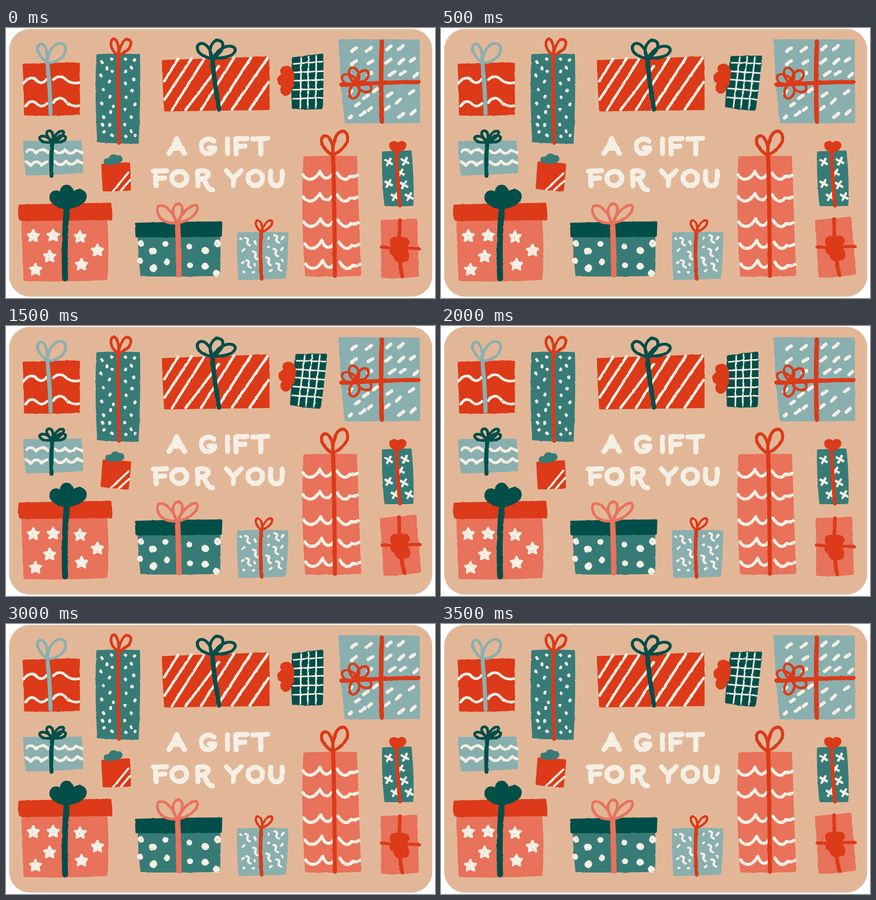
Recreate the animation shown at these times as an HTML page. Size 943 px wide and 594 px high, loop 4000 ms.

```html
<!DOCTYPE html>
<html lang="en">
<head>
<meta charset="utf-8">
<title>A gift for you</title>
<style>
  html, body { margin: 0; width: 100%; height: 100%; overflow: hidden; background: #fff; }
  svg { display: block; width: 943px; height: 594px; }
  path, ellipse { fill: none; stroke: currentColor; stroke-linecap: round; stroke-linejoin: round; }
  .fill { fill: currentColor; stroke-width: 5; }
  .red { color: #dc3a18; }
  .teal { color: #377b77; }
  .dark { color: #024e49; }
  .blue { color: #8aafaf; }
  .pink { color: #e8725a; }
  .cream { color: #f5efe4; }
  .gift { filter: url(#rough); }
  .gift .cream { filter: url(#chalk); }
  #plaid { transform-origin: 663px 118px; }
  #cube { transform-origin: 242px 328px; }
  #rose { transform-origin: 866px 484px; }
  .tilt #plaid { transform: translate(2px, .5px) rotate(6.3deg); }
  .tilt #cube { transform: translate(-1px, -1.5px) rotate(7.3deg); }
  .tilt #rose { transform: translate(1.5px, -2.5px) rotate(-3.3deg); }
</style>
</head>
<body>
<svg id="card" viewBox="0 0 943 594">
  <defs>
    <filter id="rough" color-interpolation-filters="sRGB">
      <feTurbulence type="fractalNoise" baseFrequency=".07" numOctaves="3" seed="4"/>
      <feDisplacementMap in="SourceGraphic" scale="2.6" xChannelSelector="R" yChannelSelector="G"/>
    </filter>
    <filter id="chalk" color-interpolation-filters="sRGB">
      <feTurbulence type="fractalNoise" baseFrequency=".3" numOctaves="2" seed="9"/>
      <feColorMatrix values="0 0 0 0 1  0 0 0 0 1  0 0 0 0 1  0 0 0 9 -1.7"/>
      <feComposite in="SourceGraphic" operator="in"/>
    </filter>
    <path id="star" class="fill" d="M0-12L4-4 12-3 6 3 8 11 0 7-8 11-6 3-12-3-4-4Z"/>
    <path id="cross" d="M-7-4L7 4M4-7L-4 7" stroke-width="5.5"/>
    <path id="curl" d="M0 0q8 1 5 7t5 9" stroke-width="5"/>
    <path id="scallop" d="M0 8C8 22 26 22 37 0C44 18 54 20 63 8M75 4C84 20 96 22 103 11Q111 14 119 9" stroke-width="7"/>
    <ellipse id="petal" cx="19" rx="16" ry="10.5"/>
  </defs>

  <rect x="7" y="2" width="930" height="589" rx="46" fill="#e2b798"/>

  <!-- red box, blue ribbon -->
  <g class="gift">
    <path class="fill red" d="M39 81Q100 79 160 78Q160 130 160 189Q100 191 42 190Q42 130 39 81Z"/>
    <g class="cream" stroke-width="6">
      <path d="M39 121C48 108 58 107 67 115S82 122 89 113M104 114C112 106 122 104 130 112S150 123 160 120"/>
      <path d="M43 172C50 160 60 159 68 167S84 172 90 166M104 164C112 153 122 151 130 160S150 174 160 171"/>
    </g>
    <g class="blue">
      <path stroke-width="9" d="M91 78Q97 135 98 188"/>
      <path stroke-width="6" d="M91 77C76 66 65 48 71 38C79 29 92 40 91 77C92 50 106 33 121 34C138 37 133 62 112 72Q101 77 91 77"/>
    </g>
  </g>

  <!-- tall teal box -->
  <g class="gift">
    <path class="fill teal" d="M201 60Q245 58 292 60Q294 150 289 252Q245 252 203 249Q197 150 201 60Z"/>
    <path class="cream" stroke-width="6.5" d="M210 74l1 2M232 68l1 1M222 88l0 2M233 95l1 1M208 104l1 2M228 117l-1 2M213 135l1 1M229 150l-1 2M210 165l1 2M236 172l0 1M214 195l1 2M230 184l0 2M212 212l1 2M228 212l0 2M233 236l1 1M216 228l-1 1M262 68l1 1M283 70l-1 1M275 86l1 2M263 96l-1 1M281 112l0 2M262 121l1 1M277 137l-1 2M264 152l1 1M284 167l-1 2M262 178l0 1M275 195l1 2M261 211l0 2M275 226l1 2M263 238l1 1M284 236l0 1"/>
    <g class="red">
      <path stroke-width="8" d="M247 60C246 120 247 200 249 253"/>
      <path stroke-width="6" d="M247 60C233 52 227 36 233 26C240 19 250 32 247 60C250 40 258 24 268 25C280 28 274 46 262 52Q255 58 247 60"/>
    </g>
  </g>

  <!-- wide striped box -->
  <g class="gift">
    <path class="fill red" d="M345 73Q460 69 576 65Q577 120 577 178Q460 180 350 181Q347 130 345 73Z"/>
    <path class="cream" stroke-width="6" d="M378 68L348 117M408 67L349 157M437 66L365 180M468 84L395 180M501 66L429 180M538 66L465 179M575 66L497 179M577 119L536 179"/>
    <g class="dark">
      <path stroke-width="10" d="M454 68C456 110 464 150 468 179"/>
      <path stroke-width="6.5" d="M453 67C436 64 418 56 421 40C426 27 449 34 453 67C444 50 450 28 466 27C482 29 478 46 468 56Q462 63 455 66C462 52 480 36 498 41C510 46 502 58 490 62Q474 67 455 66"/>
    </g>
  </g>

  <!-- plaid box -->
  <g class="gift" id="plaid">
    <path class="fill dark" d="M631 67Q660 63 695 59Q696 120 694 176Q660 178 631 175Q628 120 631 67Z"/>
    <path class="cream" stroke-width="3.5" d="M649 65L647 176M665 63L663 176M682 61L681 176M632 79L696 74M631 98L697 95M631 116L697 114M631 136L696 134M631 156L696 153"/>
    <path class="fill red" d="M631 103C630 84 611 82 606 91C603 98 610 104 610 104C594 106 595 126 610 125C600 137 608 150 618 146C629 141 622 131 631 126Z"/>
  </g>

  <!-- large blue box -->
  <g class="gift">
    <path class="fill blue" d="M733 27Q820 27 907 28Q907 110 908 206Q830 208 747 207Q738 130 733 27Z"/>
    <path class="cream" stroke-width="7.5" d="M760 51l10-7M792 51l11-8M837 47l9-7M864 47l9-8M759 80l11-8M796 78l10-6M836 77l9-8M864 78l10-9M889 73l9-6M795 104l8-6M843 104l11-8M867 102l10-7M897 107l8-7M754 144l6-5M786 155l10-7M808 140l8-6M838 150l10-7M858 165l9-8M887 145l9-7M769 171l7-5M797 181l6-5M779 192l10-7M834 179l8-6M864 196l10-8M891 189l8-7M755 198l5-4"/>
    <g class="red">
      <path stroke-width="10" d="M826 30C824 90 824 150 826 206"/>
      <path stroke-width="9" d="M737 125C790 123 850 118 907 119"/>
      <g transform="translate(771 121)" stroke-width="5.5">
        <use href="#petal" transform="rotate(-48)"/>
        <use href="#petal" transform="rotate(-108)"/>
        <use href="#petal" transform="rotate(203)"/>
        <use href="#petal" transform="rotate(106)"/>
        <use href="#petal" transform="rotate(26)"/>
      </g>
    </g>
  </g>

  <!-- blue zigzag box -->
  <g class="gift">
    <path class="fill blue" d="M40 251Q100 251 164 250Q167 285 167 317Q100 321 46 322Q41 290 40 251Z"/>
    <g class="cream" stroke-width="6.5">
      <path d="M46 272Q55 262 66 275Q80 261 92 274M108 270Q118 282 130 268Q142 284 154 268L167 274"/>
      <path d="M44 294L55 302Q66 287 78 301L90 294M108 294Q120 308 132 293Q144 307 156 292L167 297"/>
    </g>
    <g class="dark">
      <path stroke-width="9" d="M102 252C98 280 100 300 100 325"/>
      <path stroke-width="6" d="M102 251C85 254 72 247 74 241C80 234 95 240 102 251C88 240 85 226 96 226C104 228 104 240 102 251C106 234 118 225 125 227C132 232 118 246 103 250C112 238 128 233 131 240C132 248 120 253 103 251"/>
    </g>
  </g>

  <!-- small red box -->
  <g class="gift" id="cube">
    <path class="fill red" d="M212 301Q240 299 270 298Q272 325 272 355Q240 357 215 357Q213 330 212 301Z"/>
    <path class="cream" stroke-width="4.5" d="M269 318L236 358M273 334L253 357"/>
    <path class="fill teal" d="M234 298C222 301 215 297 218 291C220 288 225 288 228 289C229 279 240 278 242 284C249 280 256 285 253 291C249 296 242 298 234 298Z"/>
  </g>

  <!-- pink box with stars -->
  <g class="gift">
    <path class="fill pink" d="M36 422Q130 422 220 420Q225 490 221 552Q130 557 41 554Q38 490 36 422Z"/>
    <path class="fill red" d="M30 391Q130 388 229 387Q232 404 231 420Q130 422 31 422Q28 405 30 391Z"/>
    <g class="cream">
      <use href="#star" x="60" y="457"/>
      <use href="#star" x="104" y="456"/>
      <use href="#star" x="163" y="459"/>
      <use href="#star" x="201" y="489"/>
      <use href="#star" x="96" y="502"/>
      <use href="#star" x="65" y="531"/>
      <use href="#star" x="166" y="520"/>
    </g>
    <g class="dark">
      <path stroke-width="13" d="M134 392C129 440 128 510 130 551"/>
      <path class="fill" d="M129 396C114 394 96 384 98 370C101 358 113 357 121 365C118 342 147 341 147 364C158 351 176 358 175 372C173 386 152 393 139 396Z"/>
    </g>
  </g>

  <!-- teal box with dots -->
  <g class="gift">
    <path class="fill teal" d="M292 458L468 457Q470 500 468 543Q380 545 298 544Q293 500 292 458Z"/>
    <path class="fill dark" d="M286 431Q380 428 473 428L472 457Q380 458 287 458Z"/>
    <g class="cream">
      <path stroke-width="12.5" d="M296 473l1 2M350 475l1 0M294 512l1 1M353 515l1-1M403 480l0 1M404 522l1 0"/>
      <path stroke-width="15" d="M321 491l3 0M323 529l2-1M437 489l2 1M465 474l0 1M437 524l1 0M462 539l1 1"/>
    </g>
    <g class="pink">
      <path stroke-width="12" d="M377 430C379 470 380 510 380 543"/>
      <path stroke-width="6" d="M375 429C345 432 328 412 334 394C343 384 365 398 376 429C364 410 364 388 378 387C392 387 390 408 377 429C386 408 404 388 418 390C429 398 408 425 377 429"/>
    </g>
  </g>

  <!-- blue confetti box -->
  <g class="gift">
    <path class="fill blue" d="M510 452Q560 450 618 452Q618 500 613 549Q560 551 513 552Q510 500 510 452Z"/>
    <g class="cream">
      <use href="#curl" x="526" y="462"/>
      <use href="#curl" x="590" y="456"/>
      <use href="#curl" x="543" y="492"/>
      <use href="#curl" x="588" y="486"/>
      <use href="#curl" x="528" y="511"/>
      <use href="#curl" x="572" y="505"/>
      <use href="#curl" x="595" y="518"/>
      <path stroke-width="5" d="M515 463l2 1M576 463l2-2M606 465l4-5M546 470l3 5M520 490l4-4M519 517l3-2M546 519l1 3M605 488l3-4M576 482l2-1M580 535l4-3M543 538l2-1M606 511l2 2M522 536l2 1"/>
    </g>
    <g class="red">
      <path stroke-width="8" d="M561 450C558 490 560 520 562 552"/>
      <path stroke-width="5" d="M562 449C548 440 546 425 553 423C561 423 565 438 562 449C566 432 578 420 584 424C589 434 574 444 562 449"/>
    </g>
  </g>

  <!-- tall pink box -->
  <g class="gift">
    <path class="fill pink" d="M656 285Q710 283 769 284Q773 410 778 543Q720 546 660 544Q650 410 656 285Z"/>
    <g class="cream">
      <use href="#scallop" x="653" y="315"/>
      <use href="#scallop" x="653" y="363"/>
      <use href="#scallop" x="655" y="419"/>
      <use href="#scallop" x="657" y="467"/>
      <use href="#scallop" x="659" y="511"/>
    </g>
    <g class="red">
      <path stroke-width="9" d="M719 282C722 370 722 460 723 545"/>
      <path stroke-width="7" d="M718 280C700 270 688 250 696 240C706 230 722 250 718 280C718 255 724 226 742 227C758 232 754 264 718 280"/>
    </g>
  </g>

  <!-- teal box with crosses -->
  <g class="gift">
    <path class="fill teal" d="M829 274Q860 272 889 272Q895 330 893 389Q860 390 834 389Q828 330 829 274Z"/>
    <g class="cream">
      <use href="#cross" x="841" y="295"/>
      <use href="#cross" x="877" y="293"/>
      <use href="#cross" x="867" y="319"/>
      <use href="#cross" x="841" y="342"/>
      <use href="#cross" x="875" y="345"/>
      <use href="#cross" x="855" y="371"/>
      <use href="#cross" x="886" y="371"/>
    </g>
    <g class="red">
      <path stroke-width="8" d="M858 273C861 320 862 360 866 391"/>
      <path class="fill" d="M860 273C848 268 842 260 846 254C852 249 860 251 861 257C866 248 877 250 878 258C877 266 868 270 860 273Z"/>
    </g>
  </g>

  <!-- pink box, red rosette -->
  <g class="gift" id="rose">
    <path class="fill pink" d="M826 425Q865 423 901 422Q904 480 905 545Q865 549 827 547Q828 485 826 425Z"/>
    <g class="red">
      <path stroke-width="8" d="M866 423C864 460 862 500 871 547"/>
      <path stroke-width="6.5" d="M825 482C855 487 880 482 909 486"/>
      <path class="fill" d="M863 465C858 459 846 462 846 470C846 477 850 480 853 481C843 486 843 497 853 498C855 514 868 518 874 511C883 514 887 502 881 492C877 486 877 484 879 481C888 474 885 463 876 463C870 461 866 462 863 465Z"/>
    </g>
  </g>

  <!-- hand lettering -->
  <g class="gift" role="img" aria-label="A GIFT FOR YOU" color="#f5efe4" stroke-width="11">
    <path d="M358 276Q370 260 375 243Q383 262 392 276M364 265L387 264"/>
    <path d="M457 249C446 239 429 246 429 261C430 281 457 280 459 264L447 264"/>
    <path d="M487 244L487 276"/>
    <path d="M506 277L505 244 530 243M506 261L526 260"/>
    <path d="M542 244L575 243M560 244L560 277"/>
    <path d="M330 347L328 315M324 315L353 314M329 331L349 330"/>
    <ellipse cx="381" cy="331" rx="16.5" ry="15.5"/>
    <path d="M422 347L421 315C448 308 456 331 423 333M433 332C442 340 440 355 454 356"/>
    <path d="M484 314L500 331 517 314M500 331L500 347"/>
    <ellipse cx="548" cy="331" rx="16" ry="15.5"/>
    <path d="M582 315C580 336 582 347 595 347S608 333 607 315"/>
  </g>
</svg>
<script>
  const card = document.getElementById('card');
  const BEAT = 500;
  const start = performance.now();

  function frame() {
    const beat = Math.floor((performance.now() - start) / BEAT);
    card.classList.toggle('tilt', beat % 2 === 1);
    requestAnimationFrame(frame);
  }
  frame();
</script>
</body>
</html>
```
